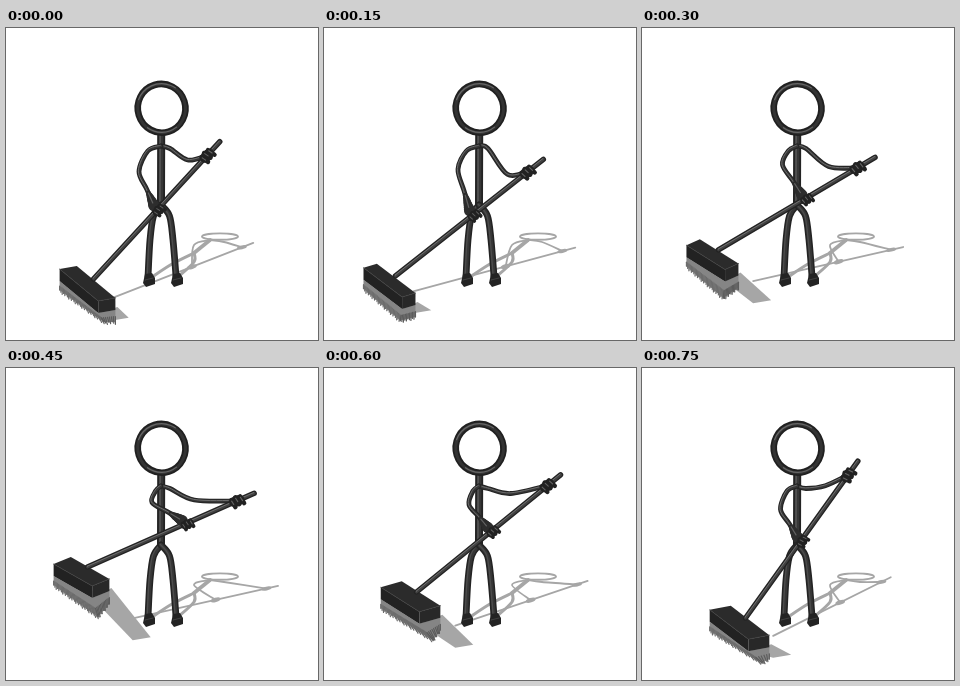
These frames come from a looping animation (312x312 px, 0.9 s). An HTML page with a canvas:

```html
<!DOCTYPE html>
<html lang="en">
<head>
<meta charset="utf-8">
<title>Sweeping figure</title>
<style>
html, body { margin: 0; width: 100%; height: 100%; overflow: hidden; background: #fff; }
canvas { display: block; width: 312px; height: 312px; }
</style>
</head>
<body>
<canvas id="stage" width="312" height="312"></canvas>
<script>
const canvas = document.getElementById('stage');
const ratio = window.devicePixelRatio || 1;
canvas.width = canvas.height = 312 * ratio;
const ctx = canvas.getContext('2d');
ctx.scale(ratio, ratio);
ctx.lineCap = ctx.lineJoin = 'round';

const HOLD = 150, STEPS = 6;
const DARK = '#232323', SHADOW = '#a6a6a6';

const pt = (x, y) => ({ x, y });
const add = (a, x, y) => pt(a.x + x, a.y + y);
const mix = (a, b, u) => pt(a.x + (b.x - a.x) * u, a.y + (b.y - a.y) * u);
const shift = (pts, x, y) => pts.map(p => add(p, x, y));

// Every moving part follows a periodic sweep of two harmonics.
function makePose(phase) {
  const c = Math.cos(phase), s = Math.sin(phase);
  const c2 = Math.cos(2 * phase), s2 = Math.sin(2 * phase);

  const foot = pt(85.5 + 3 * c - 13.9 * s - c2 - 4.6 * s2, 232.3 + 26 * c - 1.2 * s - 7.3 * c2);
  const top = pt(227.8 - 17.2 * c + 3.2 * c2 + 2 * s2, 116.6 - 5.8 * c + 17.5 * s + 2.9 * c2 + 4.5 * s2);
  const length = Math.hypot(top.x - foot.x, top.y - foot.y);
  const along = d => mix(top, foot, d / length);
  const upper = along(19 + 2 * s);
  const lower = along(87 + 8.8 * c - 4.7 * s - 4 * c2);

  const nearElbow = pt(139.5 - 6.5 * c - 2.6 * s, 139 + 4.5 * c);
  const farElbow = pt(185 - 3.3 * c, 132 + 12 * s + 4.5 * s2);

  const shadeEdge = pt(133.7 - 11 * c - 17.9 * s - 6.3 * s2, 279.5 + 10.2 * c - 2.6 * s);
  const shadeTop = pt(257.5 + 0.72 * (top.x - 228), 215.7 + 0.27 * (top.y - 117));

  return {
    foot, top, upper, lower, nearElbow, farElbow, shadeEdge, shadeTop,
    angle: Math.atan2(top.y - foot.y, top.x - foot.x),
    long: pt(19.3, 13.4 + 2.5 * c),
    deep: pt(8.6 - 2.2 * s, c - 2.5),
    bend: pt(6 - 9 * s, 14 - 5 * c)
  };
}

function trace(pts) {
  ctx.beginPath();
  pts.forEach(p => ctx.lineTo(p.x, p.y));
}

function fill(pts, color) {
  trace(pts);
  ctx.fillStyle = color;
  ctx.fill();
}

function stroke(width, color) {
  ctx.lineWidth = width;
  ctx.strokeStyle = color;
  ctx.stroke();
}

function line(pts, width, color) {
  trace(pts);
  stroke(width, color);
}

// Smooth curve through every point.
function curve(pts) {
  const at = i => pts[Math.max(0, Math.min(pts.length - 1, i))];
  const lead = (i, sign) => add(at(i),
    sign * (at(i + 1).x - at(i - 1).x) / 6, sign * (at(i + 1).y - at(i - 1).y) / 6);
  ctx.beginPath();
  ctx.moveTo(pts[0].x, pts[0].y);
  for (let i = 1; i < pts.length; i++) {
    const a = lead(i - 1, 1), b = lead(i, -1);
    ctx.bezierCurveTo(a.x, a.y, b.x, b.y, pts[i].x, pts[i].y);
  }
}

function tube(pts, width, shine = '#707070') {
  curve(pts);
  stroke(width, DARK);
  stroke(width * 0.55, '#363636');
  curve(shift(pts, -width * 0.13, -width * 0.13));
  stroke(width * 0.2, shine);
}

function oval(p, rx, ry, turn = 0) {
  ctx.beginPath();
  ctx.ellipse(p.x, p.y, rx, ry, turn, 0, Math.PI * 2);
}

function blob(p, rx, ry, color, turn) {
  oval(p, rx, ry, turn);
  ctx.fillStyle = color;
  ctx.fill();
}

function corners({ foot, long, deep }) {
  const corner = (l, d, h) => add(foot,
    -6 + l * long.x + d * deep.x, 4.5 + l * long.y + d * deep.y + h);
  const face = h => ({
    left: corner(-1, -1, h), back: corner(-1, 1, h),
    right: corner(1, 1, h), front: corner(1, -1, h)
  });
  return { upper: face(0), base: face(12) };
}

function shadows(pose, base) {
  const { shadeEdge, shadeTop } = pose;
  fill([add(base.right, 2, -3), shadeEdge, add(shadeEdge, -18, 3), base.front], SHADOW);
  const start = add(shadeEdge, -18, -19);
  const low = mix(start, shadeTop, 0.57), high = mix(start, shadeTop, 0.92);
  line([start, shadeTop], 1.8, SHADOW);
  blob(low, 5, 2.2, SHADOW, -0.3);
  blob(high, 5, 1.9, SHADOW, -0.2);

  const neck = pt(204, 212), hip = pt(188, 225);
  oval(pt(214, 208.6), 18, 3.2);
  stroke(1.9, SHADOW);
  line([neck, hip], 3.8, SHADOW);
  curve([hip, pt(166, 236), pt(146, 249)]);
  stroke(3, SHADOW);
  curve([hip, pt(188, 234), pt(172, 249)]);
  stroke(3, SHADOW);
  curve([neck, pt(218, 214), high]);
  stroke(1.8, SHADOW);
  curve([neck, pt(188, 217), low]);
  stroke(1.8, SHADOW);
}

function bristles(base, bend) {
  const roots = [base.left, base.front, base.right];
  const tips = [add(base.left, 0, 9), add(base.front, bend.x, bend.y), add(base.right, 0, 12)];
  fill([...roots, ...tips.slice().reverse()], '#858585');
  for (let side = 0; side < 2; side++) {
    const tone = side ? '#5c5c5c' : '#6c6c6c';
    const count = Math.round(Math.hypot(tips[side + 1].x - tips[side].x,
      tips[side + 1].y - tips[side].y) / 1.6);
    for (let n = 0; n <= count; n++) {
      const root = mix(roots[side], roots[side + 1], n / count);
      const tip = mix(tips[side], tips[side + 1], n / count);
      line([mix(root, tip, 0.55), add(tip, 0, n * 7 % 5 * 0.6)], 1.2, tone);
    }
  }
}

function block({ upper, base }) {
  fill([upper.left, upper.front, base.front, base.left], '#222');
  fill([upper.front, upper.right, base.right, base.front], '#282828');
  fill(Object.values(upper), '#2b2b2b');
  line([upper.left, upper.front, upper.right], 0.8, '#3d3d3d');
}

function hand(p, angle, size) {
  ctx.save();
  ctx.translate(p.x, p.y);
  ctx.rotate(angle);
  ctx.scale(size, size);
  const origin = pt(0, 0);
  blob(origin, 8, 5.5, DARK);
  for (let n = -1; n <= 1; n++) {
    const knuckle = pt(n * 4.8, -4 + Math.abs(n));
    line([knuckle, add(knuckle, 1, 8)], 4.4, '#222');
    line([add(knuckle, 0, 1), add(knuckle, 0.6, 5)], 1.1, '#636363');
  }
  ctx.restore();
}

function head() {
  const center = pt(155.6, 80.3);
  oval(center, 23.8, 24.4, -0.3);
  stroke(6.6, '#202020');
  stroke(3, '#333');
  const glint = (radius, from, to) => {
    ctx.beginPath();
    ctx.arc(center.x, center.y, radius, from, to);
    stroke(1.2, '#666');
  };
  glint(24.6, 3.5, 5.3);
  glint(24, 0.9, 2.2);
}

function shoe(x) {
  const heel = pt(x, 246);
  fill([add(heel, -4, 0), add(heel, 3, -1), add(heel, 6, 4),
    add(heel, 6, 10), add(heel, -3, 13), add(heel, -6, 9)], DARK);
  line([add(heel, -4, 6), add(heel, 4, 4)], 0.8, '#484848');
}

function body() {
  const hip = pt(155, 177);
  tube([pt(155.2, 106), hip], 8, '#555');
  tube([hip, pt(147.5, 188), pt(144, 212), pt(142, 249)], 6.8, '#4c4c4c');
  tube([hip, pt(163.5, 188), pt(167, 212), pt(170, 248)], 6.8, '#4c4c4c');
  shoe(143);
  shoe(171);
  head();
}

// The forearm widens toward the lower hand.
function cuff(from, to) {
  for (let u = 0.6; u <= 1; u += 0.04) {
    blob(mix(from, to, u), 2.4 + (u - 0.6) * 9, 2.4 + (u - 0.6) * 9, '#2d2d2d');
  }
  line([mix(from, to, 0.6), mix(from, to, 0.88)], 1.2, '#606060');
}

function draw(pose) {
  const box = corners(pose);
  const shoulder = pt(155, 118);
  ctx.fillStyle = '#fff';
  ctx.fillRect(0, 0, 312, 312);
  shadows(pose, box.base);
  bristles(box.base, pose.bend);
  block(box);
  body();

  tube([shoulder, pt(164, 120.5), pose.farElbow, pose.upper], 4.8);
  const wrist = add(pose.lower, -3, -2);
  const bicep = pt(mix(shoulder, pose.nearElbow, 0.6).x, 123);
  tube([shoulder, bicep, pose.nearElbow, mix(pose.nearElbow, wrist, 0.5), wrist], 4.8);

  const stick = [pose.foot, pose.top];
  line(stick, 5.4, DARK);
  line(stick, 2.8, '#414141');
  line(shift(stick, -0.5, -0.7), 1, '#707070');
  cuff(pose.nearElbow, wrist);
  hand(add(pose.lower, 1, 1), pose.angle, 0.85);
  hand(pose.upper, pose.angle, 1);
}

let shown = -1;
const start = performance.now();

function tick() {
  const step = Math.floor((performance.now() - start) / HOLD) % STEPS;
  if (step !== shown) {
    shown = step;
    draw(makePose(step / STEPS * Math.PI * 2));
  }
  requestAnimationFrame(tick);
}
tick();
</script>
</body>
</html>
```
